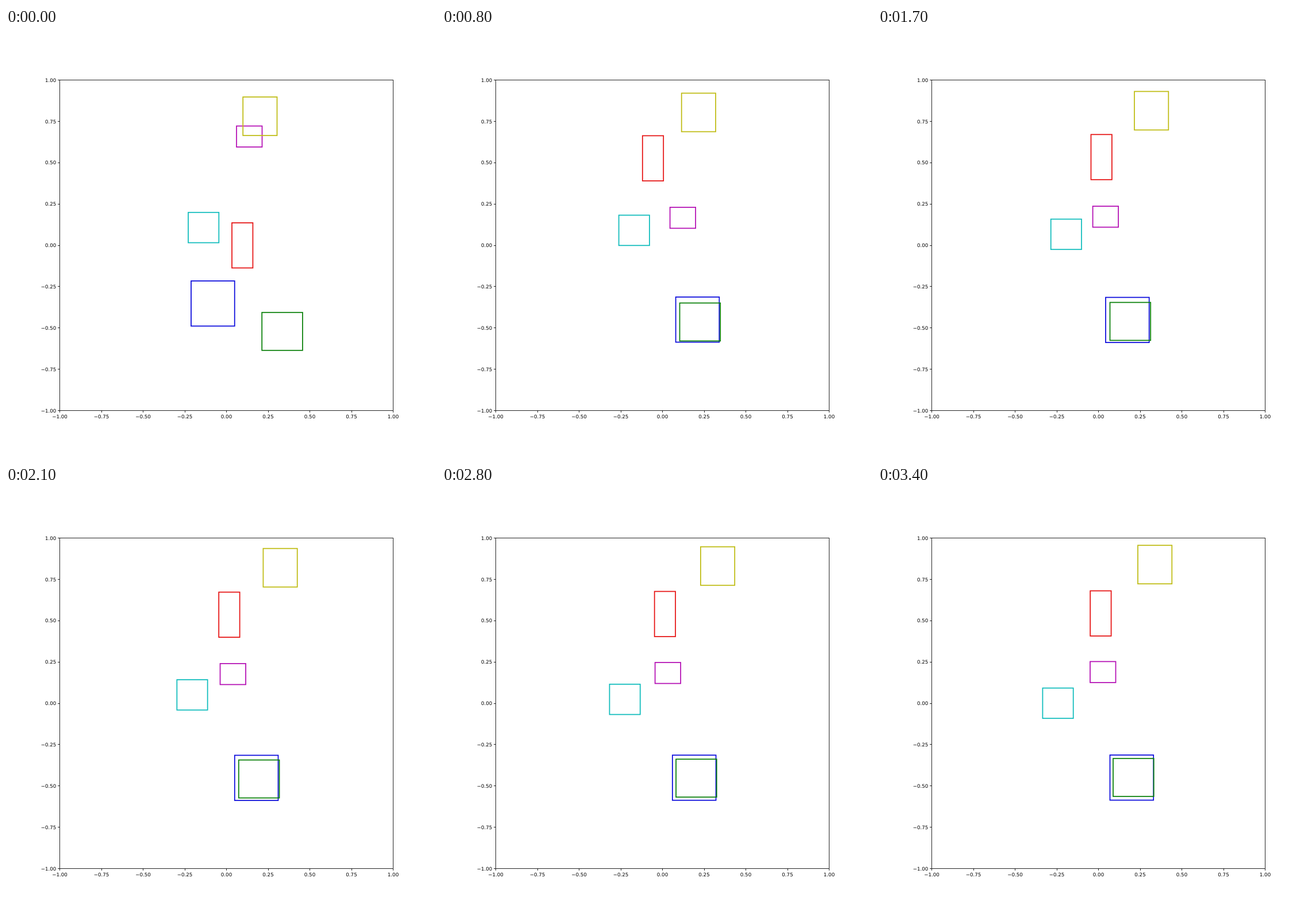
An HTML page that plays this animation: 748 by 748 pixels, repeating every 3500 ms.

```html
<!DOCTYPE html>
<html lang="en">
<head>
<meta charset="utf-8">
<title>Moving boxes</title>
<style>
  html, body { margin: 0; width: 100%; height: 100%; overflow: hidden; background: #fff; }
  svg { display: block; }
  text { font: 8.66px "DejaVu Sans", sans-serif; fill: #000; text-rendering: geometricPrecision; }
  .axes { fill: none; stroke: #000; stroke-width: .85; }
  .boxes { fill: none; stroke-width: 1.75; }
</style>
</head>
<body>
<svg width="748" height="748" viewBox="0 0 748 748">
  <g class="axes"></g>
  <g class="labels"></g>
  <g class="boxes"></g>
</svg>
<script>
const LOOP = 3500, STEP = 100;
const LEFT = 93.5, RIGHT = 673.5, TOP = 90.5, BOTTOM = 665.5;

// Three phases: a long jump, a settling move and a steady drift.
const phases = [
  { from: 0, to: 800, power: 1.5 },
  { from: 800, to: 1700, power: 2 },
  { from: 1700, to: 3400, power: 1 }
];

// Top left corner of each box where the phases meet.
const boxes = [
  { color: '#0b0bdc', w: 75.7, h: 78.5, path: [[322, 440], [406.6, 468], [396, 468.6], [403.5, 468]] },
  { color: '#0a800a', w: 70.7, h: 66, path: [[445.2, 494.8], [413.5, 478.4], [403.5, 477.4], [409, 474]] },
  { color: '#e61414', w: 36.4, h: 78.5, path: [[393, 338.9], [348.8, 187.4], [370.5, 185.3], [369.2, 182.4]] },
  { color: '#10bcbc', w: 53.3, h: 52.7, path: [[317, 320.8], [307.6, 325.6], [300.7, 332.5], [286.4, 351.5]] },
  { color: '#b40fb4', w: 44.5, h: 36.5, path: [[401, 170.5], [396.6, 311.9], [373.6, 310], [369, 305.4]] },
  { color: '#bfbc14', w: 59.3, h: 67, path: [[412.2, 120], [416.7, 113.4], [446, 110.4], [452, 103.2]] }
];

const $ = s => document.querySelector(s);
const mix = (a, b, k) => a + (b - a) * k;
const snap = v => Math.floor(v) + .5;

function add(parent, tag, attrs, text = '') {
  const el = document.createElementNS('http://www.w3.org/2000/svg', tag);
  for (const key in attrs) el.setAttribute(key, attrs[key]);
  el.textContent = text;
  return parent.appendChild(el);
}

function drawAxes() {
  const axes = $('.axes'), labels = $('.labels');
  add(axes, 'rect', { x: LEFT, y: TOP, width: RIGHT - LEFT, height: BOTTOM - TOP });
  for (let i = 0; i <= 8; i++) {
    const text = (i / 4 - 1).toFixed(2).replace('-', '\u2212');
    const x = mix(LEFT, RIGHT, i / 8), y = mix(BOTTOM, TOP, i / 8);
    add(axes, 'path', { d: `M${snap(x)} ${BOTTOM}v3.4M${LEFT} ${snap(y)}h-3.4` });
    add(labels, 'text', { x, y: 678.7, 'text-anchor': 'middle' }, text);
    add(labels, 'text', { x: 87.3, y: y + 3.2, 'text-anchor': 'end' }, text);
  }
}

function render() {
  const t = Math.floor(performance.now() % LOOP / STEP) * STEP;
  const i = phases.findIndex(p => t <= p.to);
  const { from, to, power } = phases[i];
  const k = 1 - (1 - (t - from) / (to - from)) ** power;
  for (const { el, path } of boxes) {
    el.setAttribute('x', mix(path[i][0], path[i + 1][0], k));
    el.setAttribute('y', mix(path[i][1], path[i + 1][1], k));
  }
  requestAnimationFrame(render);
}

drawAxes();
for (const box of boxes) {
  box.el = add($('.boxes'), 'rect', { width: box.w, height: box.h, stroke: box.color });
}
render();
</script>
</body>
</html>
```
